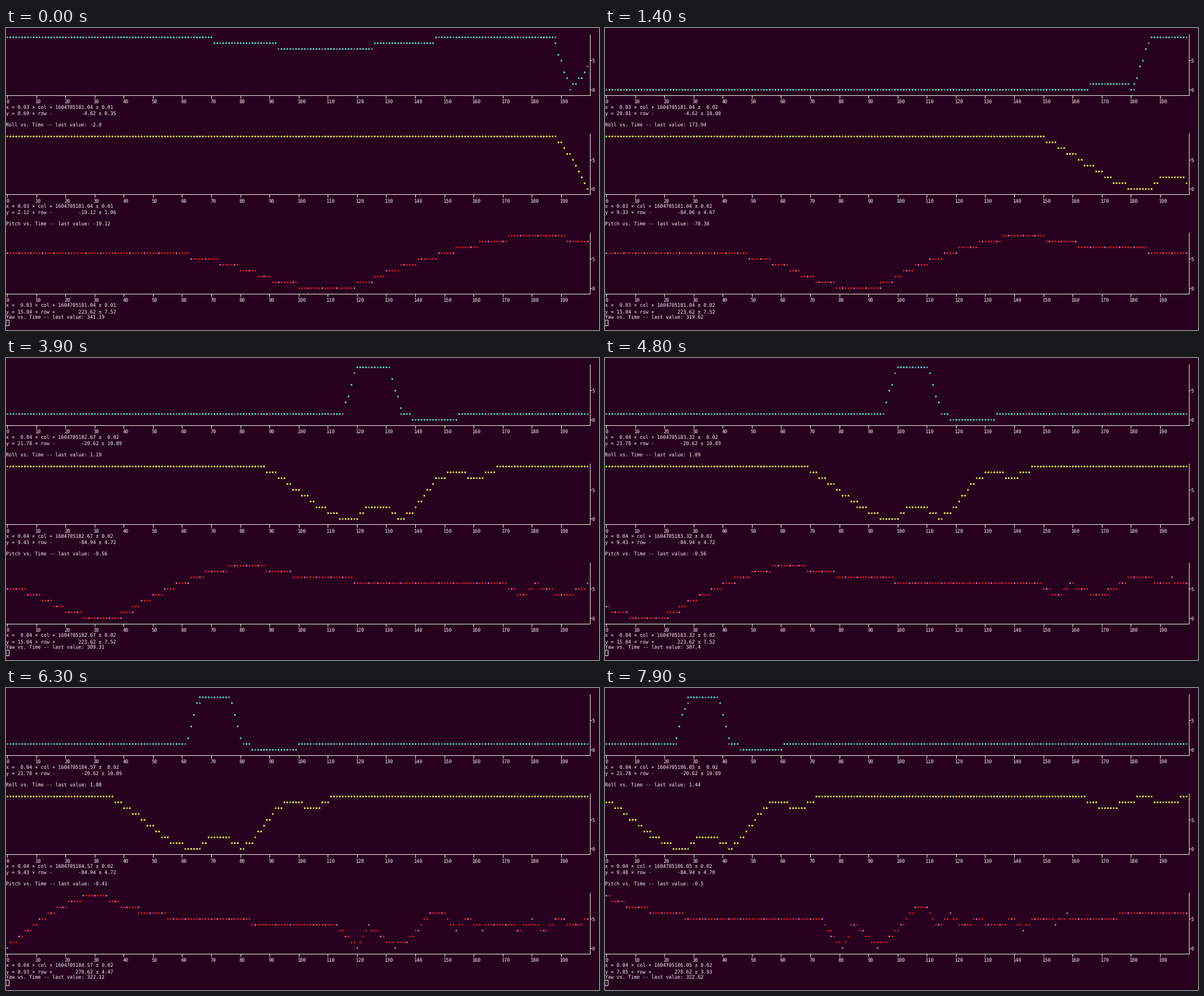
Animation, 1049 px wide and 534 px high, one loop 8 s. Source, as a matplotlib script:

```python
import numpy as np
import matplotlib as mpl
import matplotlib.pyplot as plt
from matplotlib.animation import FuncAnimation
from matplotlib.colors import to_rgba
from matplotlib.patches import Rectangle

W, H, DPI = 1049, 534, 64
PT = 72 / DPI                      # points per pixel
CW, LH = 5.157, 10.314             # terminal cell
BG, FG = "#27001d", "#f6f2f4"
COLS, ROWS, KEEP = 200, 10, 49
START = 1604705181.036
FRAMES, STEP_MS = 80, 100

mpl.rcParams.update({
    "toolbar": "None",
    "font.family": "DejaVu Sans Mono",
    "font.size": CW / 0.602 * PT,
    "text.hinting": "none",
    "text.color": FG,
})

# Bursts of new samples: (first ms, last ms, count)
BURSTS = [(100, 1100, 7), (1200, 1700, 4), (2000, 2200, 2), (2500, 3400, 7),
          (3600, 4600, 7), (4800, 5800, 7), (5900, 6900, 7), (7100, 7900, 6)]
arrive = np.concatenate([np.linspace(*burst) for burst in BURSTS])
shown = np.floor(arrive / STEP_MS + 0.501)

# Sample clock: a history that is already there, then the live samples
FIRST = 39
past = np.interp(np.arange(FIRST), [0, 4, 13, 23, 27, 37, 38],
                 [0, 0.42, 1.63, 2.94, 3.53, 5.01, 5.16])
clock = np.concatenate([past, 5.2 + arrive / 1000])


def smooth(x, keys):
    """Monotone cubic curve through (time, value) keys."""
    k, v = np.transpose(keys)
    h, d = np.diff(k), np.diff(v) / np.diff(k)
    a, b = d[:-1], d[1:]
    same = a * b > 0
    m = np.zeros_like(v)
    m[1:-1][same] = 2 * (a * b)[same] / (a + b)[same]
    i = np.clip(np.searchsorted(k, x, "right") - 1, 0, len(k) - 2)
    s = np.clip((x - k[i]) / h[i], 0, 1)
    ease = s * s * (3 - 2 * s)
    bend = s * (1 - s) * (m[i] * (1 - s) - m[i + 1] * s)
    return v[i] + (v[i + 1] - v[i]) * ease + h[i] * bend


roll = smooth(clock, [
    (0, 1.5), (1.4, 1.5), (2.85, 0.3), (4.3, 1.6), (4.6, 1.6), (4.862, 1.4),
    (5.01, -4.62), (5.16, -2), (5.633, 8), (5.8, 8), (5.967, 4), (6.133, 164),
    (6.4, 175.43), (6.56667, 173.94), (6.733, 5), (6.9, -18), (7.2, -20.62),
    (7.7, 0.69), (9.133, 1.19), (10.833, 1), (13.1, 1.44)])

pitch = smooth(clock, [
    (0, -0.5), (4.1, -0.06), (4.5, -0.06), (4.862, -0.3), (5.16, -19.12),
    (5.633, -62), (5.967, -82.5), (6.133, -84.06), (6.35, -63),
    (6.56667, -70.38), (6.7333, -84.94), (7.2, -19), (7.4, -8), (7.7, -19.44),
    (8, -0.6), (9.133, -0.56), (10.833, -0.56), (11.1, -0.34), (11.6, -0.5),
    (11.95, -18), (12.1, -17), (12.5, -2), (12.8, -9), (12.95, -8), (13.1, -0.5)])

yaw = smooth(clock, [
    (0, 311), (1.45, 310.5), (1.9, 290), (2.55, 232), (2.94, 223.62),
    (3.53, 280), (4.2, 337), (4.714, 359), (5.01, 349.28), (5.16, 341.19),
    (5.55, 331), (6.1, 321.4), (6.56667, 319.62), (7.7, 316.88), (8, 316.8),
    (8.3, 278.62), (8.45, 312), (8.8, 282), (9.13333, 309.31), (9.3, 332),
    (9.467, 333.6), (9.6, 317), (10.8333, 312), (11.4333, 322.12),
    (11.7, 318.7), (12.4, 323.4), (13.1, 322.62)])
wobble = 8 * np.cos(2 * np.pi * (clock - 10.83333) / 0.4)
yaw -= np.where((clock > 9.53) & (clock < 11.34), wobble, 0)


def cell_x(col):
    return (np.asarray(col) + 0.5) * CW


def line_y(line):
    return 6.2 + LH * np.asarray(line)


def pixel(v):
    return np.floor(v) + 0.5


fig = plt.figure(figsize=(W / DPI, H / DPI), dpi=DPI, facecolor=BG)
ax = fig.add_axes([0, 0, 1, 1])
ax.set(xlim=(0, W), ylim=(H, 0))
ax.axis("off")


def write(col, line, text=""):
    return ax.text(col * CW, line_y(line) + 3.4, text, va="baseline")


def h_rule(x0, x1, y):
    ax.plot([x0, x1], [pixel(y)] * 2, color=FG, lw=PT,
            solid_capstyle="butt", snap=False)


def v_rule(x, y0, y1):
    ax.plot([pixel(x)] * 2, [y0, y1], color=FG, lw=PT,
            solid_capstyle="butt", snap=False)


class Plot:
    def __init__(self, name, data, top, title_line, line_color, dot_color):
        self.name, self.data, self.top = name, data, top
        self.colors = to_rgba(line_color), to_rgba(dot_color)
        base = top + ROWS
        edge, floor = cell_x(COLS), line_y(base)
        h_rule(0, edge, floor)
        v_rule(edge, line_y(top) - LH / 2, floor)
        for col in range(0, COLS, 10):
            v_rule(cell_x(col), floor, floor + LH / 2)
            write(col, base + 1, str(col))
        for row in (0, 5):
            h_rule(edge, edge + CW / 2, line_y(base - 1 - row))
            write(COLS + 1, base - 1 - row, str(row))
        self.dots = ax.scatter([], [], s=(3.2 * PT) ** 2, linewidths=0)
        self.x_text, self.y_text = write(0, base + 2), write(0, base + 3)
        self.title = write(0, title_line)

    def update(self, view):
        t, v = clock[view], self.data[view]
        dx, dy = np.ptp(t) / (COLS - 1), np.ptp(v) / (ROWS - 1)
        x, y = (t - t[0]) / dx, (v - v.min()) / dy
        col, row = np.rint(x), np.rint(y)
        grid = np.arange(COLS)
        fill = np.rint(np.interp(grid, x, y))
        free = ~np.isin(grid * ROWS + fill, col * ROWS + row)
        cols = np.concatenate([grid[free], col])
        rows = np.concatenate([fill[free], row])
        self.dots.set_offsets(np.column_stack(
            [cell_x(cols), line_y(self.top + ROWS - 1 - rows)]))
        self.dots.set_facecolors(
            [self.colors[0]] * int(free.sum()) + [self.colors[1]] * len(col))
        self.label(dx, START + t[0], dy, v.min(), v[-1])

    def label(self, dx, x0, dy, y0, last):
        wide = max(len(f"{s:.2f}") for s in (dx, dy))
        tail = max(len(f"{s / 2:.2f}") for s in (dx, dy))
        off = len(f"{x0:.2f}")
        sign, pad = ("-", off + 1) if y0 < 0 else ("+", off)
        self.x_text.set_text(
            f"x = {dx:{wide}.2f} × col + {x0:.2f} ± {dx / 2:{tail}.2f}")
        self.y_text.set_text(
            f"y = {dy:{wide}.2f} × row {sign} {y0:{pad}.2f} ± {dy / 2:{tail}.2f}")
        self.title.set_text(
            f"{self.name} vs. Time -- last value: {round(float(last), 2)}")


plots = [
    Plot("Roll", roll, 1, 16, "#40e0d0", "#86828c"),
    Plot("Pitch", pitch, 18, 33, "#f8f03c", "#9ade30"),
    Plot("Yaw", yaw, 35, 49, "#d4142e", "#b070a8"),
]
ax.add_patch(Rectangle((0, 516.5), 5.5, 10, fill=False, ec=FG, lw=PT, snap=False))


def draw(frame):
    end = FIRST + int(np.sum(shown <= frame))
    view = slice(max(0, end - KEEP), end)
    for plot in plots:
        plot.update(view)
    return []


anim = FuncAnimation(fig, draw, frames=FRAMES, interval=STEP_MS,
                     repeat=True, repeat_delay=0, cache_frame_data=False)
plt.show()
```
